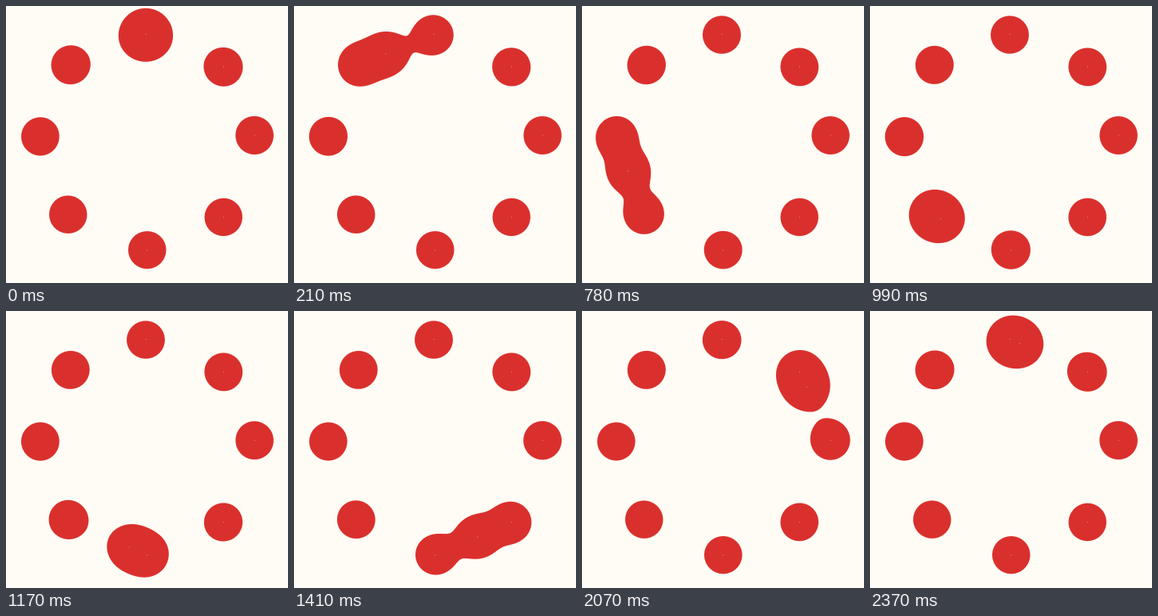
Write an HTML page with a canvas that moves like this. It is 353 by 347 pixels and loops after 2400 ms.

```html
<!DOCTYPE html>
<html lang="en">
<head>
<meta charset="utf-8">
<title>Metaball ring</title>
<style>
  html, body { margin: 0; height: 100%; overflow: hidden; background: #fffcf5; }
  canvas { display: block; }
</style>
</head>
<body>
<canvas id="stage" width="353" height="347"></canvas>
<script>
const ctx = document.getElementById('stage').getContext('2d');
const { width, height } = ctx.canvas;
const image = ctx.createImageData(width, height);

const LOOP = 2400, STEP = 30, LEG = 300;
const INK = [218, 48, 45], PAPER = [255, 252, 245];
const DOT_CHARGE = 479, MOVER_CHARGE = 490;

// Counter-clockwise from the top.
const dots = [
  [175, 35.7], [80.5, 73.5], [42.5, 163.5], [77.5, 261.5],
  [176.7, 306], [272.5, 264.7], [311.5, 162.2], [272.5, 76]
];

// The mover crosses each side at constant speed and rests briefly on each dot.
function moverAt(time) {
  const leg = Math.max(0, Math.floor((time - STEP) / LEG));
  const start = leg ? leg * LEG + 2 * STEP : 0;
  const end = Math.min((leg + 1) * LEG + STEP, LOOP);
  const u = Math.min(1, Math.max(0, (time - start) / (end - start)));
  const [x0, y0] = dots[leg % 8], [x1, y1] = dots[(leg + 1) % 8];
  return [x0 + (x1 - x0) * u, y0 + (y1 - y0) * u];
}

// Fraction of the pixel covered by the region where the summed field exceeds 1.
function coverage(x, y, balls) {
  let field = 0, gx = 0, gy = 0;
  for (const [bx, by, charge] of balls) {
    const dx = x - bx, dy = y - by;
    const d2 = dx * dx + dy * dy + 0.01;
    const f = charge / d2;
    field += f;
    gx += 2 * f * dx / d2;
    gy += 2 * f * dy / d2;
  }
  const slope = Math.max(Math.hypot(gx, gy), 1e-4);
  return Math.min(1, Math.max(0, (field - 1) / slope + 0.5));
}

function draw(time) {
  const balls = dots.map(([x, y]) => [x, y, DOT_CHARGE]);
  balls.push([...moverAt(time), MOVER_CHARGE]);
  let i = 0;
  for (let y = 0; y < height; y++) {
    for (let x = 0; x < width; x++) {
      const c = coverage(x + 0.5, y + 0.5, balls);
      for (let k = 0; k < 3; k++) image.data[i++] = PAPER[k] + (INK[k] - PAPER[k]) * c;
      image.data[i++] = 255;
    }
  }
  ctx.putImageData(image, 0, 0);
}

let shown = -1;
function tick() {
  const time = Math.floor(performance.now() % LOOP / STEP) * STEP;
  if (time !== shown) draw(shown = time);
  requestAnimationFrame(tick);
}
tick();
</script>
</body>
</html>
```
